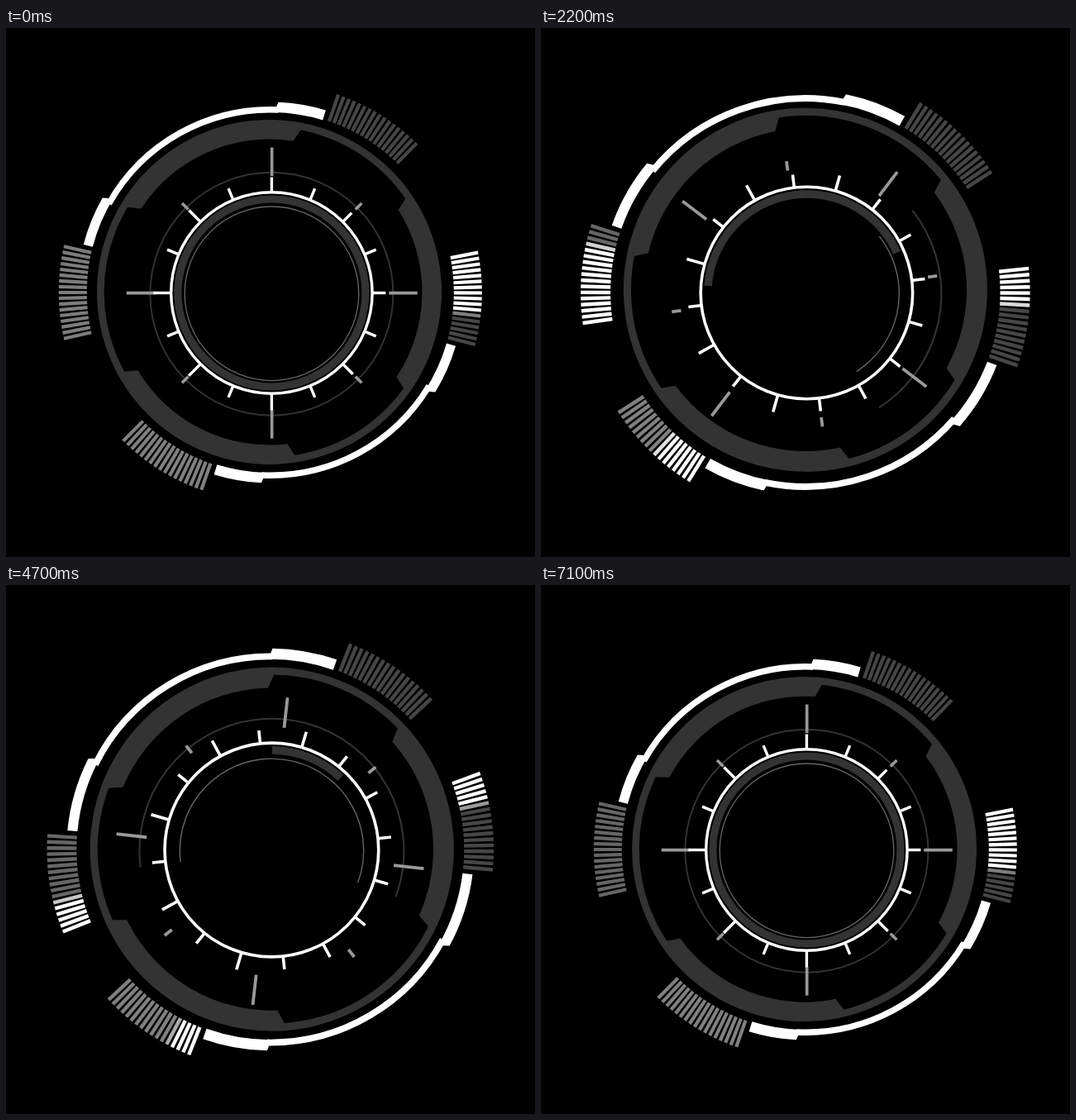
These frames come from a looping animation (640 by 640 pixels, 7200 ms). An HTML page with a canvas:

```html
<!DOCTYPE html>
<html>
<head>
<meta charset="utf-8">
<title>HUD dial</title>
<style>
  html, body { margin: 0; width: 100%; height: 100%; overflow: hidden; background: #000; }
  canvas { display: block; width: 640px; height: 640px; }
</style>
</head>
<body>
<canvas id="dial" width="640" height="640"></canvas>
<script>
const ctx = document.getElementById('dial').getContext('2d');
const LOOP = 7200, STEP = 100, BARS = 17;

// Rows of [time in ms, value]
const swing = {
  outer: [[0, 1], [3250, 1.081], [7100, 1]],
  plate: [[0, 1], [3450, 1.078], [6900, 1]],
  inner: [[0, 1], [3600, 1.08], [7200, 1]],
  halo: [[0, 1], [3100, 1.135], [7100, 1]],
  diagonal: [[0, 0], [2500, 13], [4900, 2.2], [6900, 0]],
  side: [[0, 0], [2000, 5], [4600, -9.2], [6900, 0]],
  stretch: [[0, 0], [3700, 1], [7100, 0]],
  ticks: [[0, 0], [3450, 22.2], [7100, 0]],
  marks: [[0, 0], [3000, 152.5], [7100, 0]],
  bandLength: [[0, 360], [4000, 0], [7100, 360]],
  bandEnd: [[0, 0], [2800, 74], [7100, 0]],
  lineLength: [[0, 360], [2350, 93], [2700, 93], [7100, 360]],
  lineEnd: [[0, 90], [1500, 150], [6800, 90]]
};
const lit = {
  left: [[0, 17], [850, 17], [1200, 16.3], [2200, 13.7], [3000, 10.9], [3900, 7.5], [5400, 4], [6900, 0]],
  right: [[0, 11.3], [1200, 8.4], [2200, 6.8], [3000, 6], [4000, 4.9], [5400, 6], [6900, 11.3]],
  lower: [[0, 0], [2550, 9], [6700, 0]]
};
const tickEnds = [140, 137, 138, 139, 142, 142, 143, 141.5];

const clamp = x => Math.min(1, Math.max(0, x));
const smooth = x => (1 - Math.cos(Math.PI * x)) / 2;
const rad = deg => (deg - 90) * Math.PI / 180;
const grey = v => `rgb(${v},${v},${v})`;

function track(keys, t, ease = x => x) {
  const i = keys.findIndex(k => k[0] > t);
  if (i < 0) return keys[keys.length - 1][1];
  const [t0, a] = keys[i - 1], [t1, b] = keys[i];
  return a + (b - a) * ease((t - t0) / (t1 - t0));
}
const pose = (name, t) => track(swing[name], t, smooth);

function at(x, y, scale, draw) {
  ctx.save();
  ctx.translate(x, y);
  ctx.scale(scale, scale);
  draw();
  ctx.restore();
}

// Turns a part whose own centre lies slightly off the pivot
function turned(angle, dx, dy, draw) {
  ctx.save();
  ctx.rotate(angle * Math.PI / 180);
  ctx.translate(dx, dy);
  draw();
  ctx.restore();
}

function arc(r, from, to, width, color) {
  ctx.beginPath();
  ctx.arc(0, 0, r, rad(from), rad(to));
  ctx.lineWidth = width;
  ctx.strokeStyle = color;
  ctx.stroke();
}

function spoke(angle, r0, r1, width, color) {
  const c = Math.cos(rad(angle)), s = Math.sin(rad(angle));
  ctx.beginPath();
  ctx.moveTo(c * r0, s * r0);
  ctx.lineTo(c * r1, s * r1);
  ctx.lineWidth = width;
  ctx.strokeStyle = color;
  ctx.stroke();
}

// Ring sector with its own angles on the inner and outer edge
function sector(r0, in0, in1, r1, out0, out1, color) {
  ctx.beginPath();
  ctx.arc(0, 0, r1, rad(out0), rad(out1));
  ctx.arc(0, 0, r0, rad(in1), rad(in0), true);
  ctx.closePath();
  ctx.fillStyle = color;
  ctx.fill();
}

// Bars light up from the counterclockwise end
function fan(center, base, count, level = 1) {
  for (let i = 0; i < BARS; i++) {
    const v = Math.round(base + (255 - base) * clamp(count - i) * level);
    spoke(center + (i - (BARS - 1) / 2) * 1.59, 219, 253, 4.2, grey(v));
  }
}

function thinArc(from, to) {
  ctx.beginPath();
  ctx.ellipse(0, 0, 223.4, 221.2, 0, rad(from), rad(to));
  ctx.lineWidth = 7.4;
  ctx.strokeStyle = '#fff';
  ctx.stroke();
}

function drawOuter(t) {
  const a = pose('diagonal', t), b = pose('side', t), stretch = pose('stretch', t);
  const upper = 31.7 + a, lower = 212 + a, left = 270 + b, right = 91.7 + b;
  const tailA = 29.3 + 5.2 * stretch, tailB = 29.8 + 7.8 * stretch;
  const flash = clamp(0.15 + t / 600);

  thinArc(left + tailB - 0.8, upper + 360 - tailA);
  thinArc(right + tailB - 0.8, lower - tailA);

  for (const c of [upper, lower])
    sector(218, c - tailA - 1.2, c - 14.8, 230.5, c - tailA, c - 14.8, '#fff');
  fan(upper, 70, 0);
  fan(lower, 128, track(lit.lower, t));

  const sides = [[-3, left, 102, track(lit.left, t), flash], [3, right, 70, track(lit.right, t), 1]];
  for (const [dx, c, base, count, level] of sides) {
    ctx.save();
    ctx.translate(dx, 0);
    sector(219, c + 14.6, c + tailB + 1.5, 230.5, c + 14.6, c + tailB, '#fff');
    fan(c, base, count, level);
    ctx.restore();
  }
}

function drawPlate() {
  arc(204.2, 0, 360, 8.6, '#333');
  for (const c of [336, 90.6, 206.2])
    sector(185, c - 33, c + 33, 201, c - 35.2, c + 35.2, '#333');
}

function drawMarks() {
  for (let i = 0; i < 4; i++) {
    spoke(i * 90, 141.5, 176, 3.6, '#999');
    spoke(i * 90 + 45, 143, 153.7, 3.6, '#999');
  }
}

function drawCore(t) {
  const angle = pose('ticks', t), end = pose('bandEnd', t);
  arc(113.5, end - pose('bandLength', t), end, 9, '#333');
  for (let i = 0; i < 16; i++)
    spoke(angle + i * 22.5, 121, i % 2 ? 136.7 : tickEnds[i / 2], 3.4, '#fff');
  arc(121.7, 0, 360, 3.4, '#fff');
}

function draw(t) {
  ctx.fillStyle = '#000';
  ctx.fillRect(0, 0, 640, 640);
  const outer = pose('outer', t), inner = pose('inner', t);
  const end = pose('lineEnd', t), start = end - pose('lineLength', t);

  at(319.8, 320, outer, () => drawOuter(t));
  at(320.1, 318.7, pose('plate', t), () => turned(t / LOOP * 360, -1.6, 0.8, drawPlate));
  at(321.4, 321.7, pose('halo', t), () => arc(147, start, end, 1.9, '#333'));
  at(321.5, 321.3, outer, () => arc(105.3, start, end, 1.3, '#666'));
  at(320, 320.4, inner, () => turned(pose('marks', t), 1.7, 0.2, drawMarks));
  at(321.4, 320.5, inner, () => drawCore(t));
}

const begin = performance.now();
function tick() {
  const t = (performance.now() - begin) % LOOP;
  draw(Math.floor(t / STEP) * STEP);
  requestAnimationFrame(tick);
}
tick();
</script>
</body>
</html>
```
